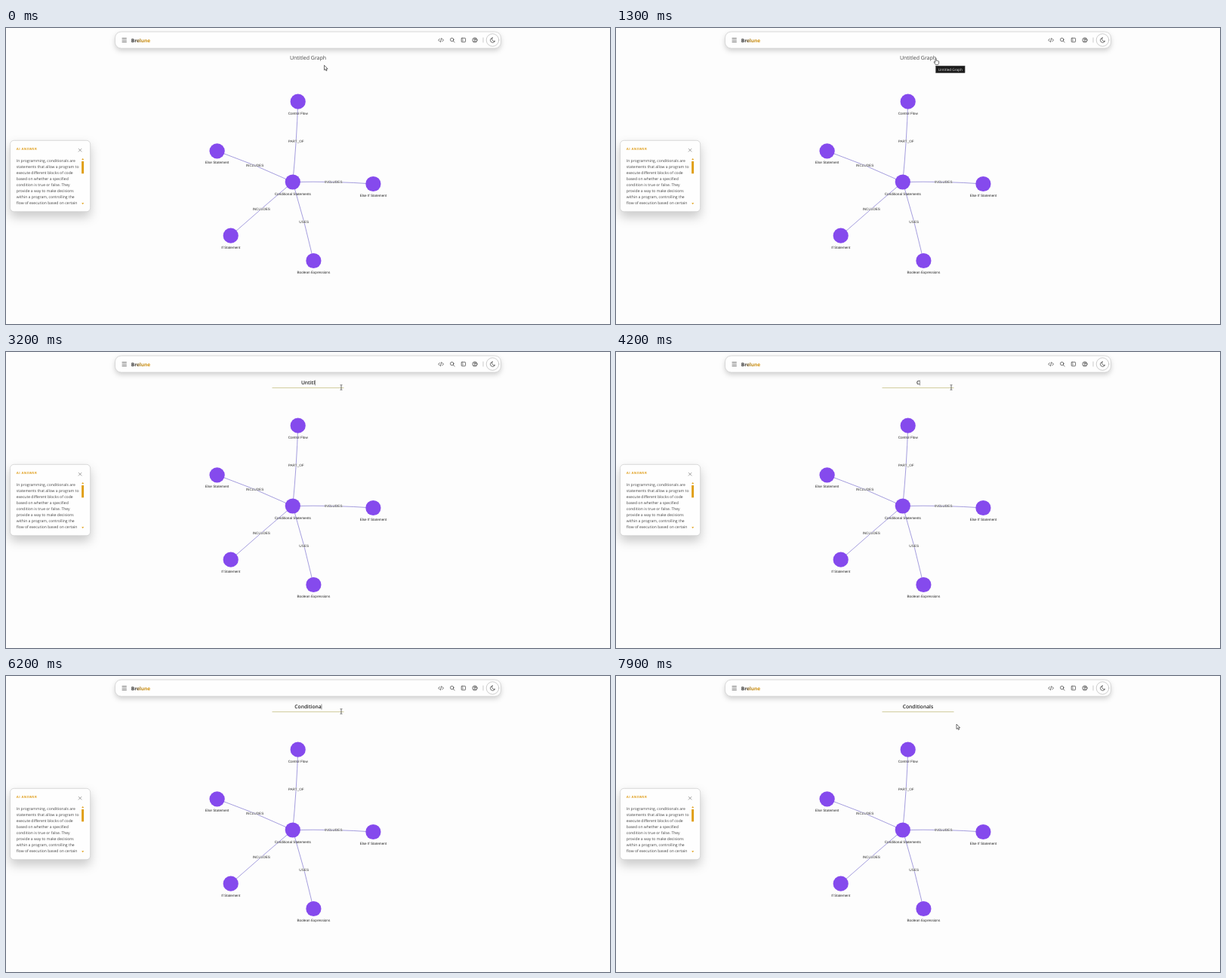
An HTML page that plays this animation: 800 by 393 pixels, repeating every 8000 ms.

```html
<!DOCTYPE html>
<html lang="en">
<head>
<meta charset="utf-8">
<title>Graph title editing</title>
<style>
  html, body { margin: 0; width: 100%; height: 100%; overflow: hidden; background: #fdfdfd; }
  svg { display: block; width: 100%; height: 100%; }
  text { font-family: "Open Sans", "Noto Sans", sans-serif; text-rendering: geometricPrecision; }
  .center { text-anchor: middle; }
  .card { fill: #fefefe; stroke: #d0d0d0; stroke-width: .8; }
  .bar { filter: drop-shadow(0 3px 3px rgba(0, 0, 0, .17)); }
  .panel { filter: drop-shadow(0 7px 7px rgba(0, 0, 0, .2)); }
  .icon { fill: none; stroke: #444; stroke-width: .75; stroke-linecap: round; stroke-linejoin: round; }
  #graph text { font: 4.67px "Liberation Sans", Arial, sans-serif; text-anchor: middle; fill: #222; }
  #graph path { fill: none; stroke: #8f86d6; stroke-width: .8; }
  #graph circle { fill: #854aed; }
  #graph .edge { fill: #333; stroke: #fdfdfd; stroke-width: .7; paint-order: stroke; }
  #body text { font-size: 5.05px; fill: #444; }
  #cursor path { fill: #fff; stroke: #222; stroke-width: .65; stroke-linejoin: round; }
</style>
</head>
<body>
<svg viewBox="0 0 800 393" preserveAspectRatio="none">
  <defs>
    <linearGradient id="brand">
      <stop offset=".2" stop-color="#303030"/>
      <stop offset=".5" stop-color="#b98312"/>
      <stop offset="1" stop-color="#d9940c"/>
    </linearGradient>
  </defs>

  <g id="graph"></g>

  <rect class="card bar" x="144.5" y="5" width="511" height="22" rx="8"/>
  <path class="icon" d="M154 13.7h5.4M154 16.1h5.4M154 18.5h5.4"/>
  <text x="165.8" y="18.5" font-size="6.5" font-weight="700" fill="url(#brand)">Brelune</text>
  <g class="icon">
    <path d="M574.4 14.3l-1.7 1.8 1.7 1.8M577.8 14.3l1.7 1.8-1.7 1.8M576.7 13.6l-1.2 5"/>
    <path d="M592.5 17.4l1.6 1.6"/><circle cx="590.7" cy="15.5" r="2.2"/>
    <rect x="603.2" y="13.4" width="5.4" height="5.2" rx=".8"/>
    <path d="M604.5 15.2l1.1 .9-1.1 .9"/>
    <circle cx="621" cy="16" r="3.1"/><circle cx="621" cy="15.1" r="1.1"/>
    <path d="M619.1 18.3q1.9-2.2 3.8 0"/>
    <path d="M632 13v6" stroke="#bbb"/>
    <circle cx="644.5" cy="16" r="8.3" stroke="#bdbdbd"/>
    <path d="M644.2 13a3.2 3.2 0 1 0 3.5 4.2a2.8 2.8 0 0 1-3.5-4.2z"/>
  </g>

  <rect class="card panel" x="5.5" y="149.3" width="106.2" height="94.5" rx="5"/>
  <text x="13.8" y="161.7" font-size="4.3" font-weight="700" letter-spacing=".4" fill="#e0a020">AI ANSWER</text>
  <path class="icon" d="M96.2 160.3l3.8 3.8M100 160.3l-3.8 3.8" stroke-width=".5" style="stroke:#888"/>
  <g id="body"></g>
  <g fill="#e09f16">
    <rect x="100.1" y="177" width="3" height="16.3"/>
    <path d="M100.2 175l1.5-1.9 1.5 1.9zM100.2 232.3l1.5 1.9 1.5-1.9z"/>
  </g>

  <path id="underline" d="M352.5 47.6h95" stroke="#cdc894" stroke-width=".9"/>
  <text id="title" class="center" x="400"></text>
  <path id="caret" stroke="#222" stroke-width=".5"/>
  <g id="tooltip">
    <rect x="423.5" y="50.3" width="38.6" height="9.3" fill="#1b1b1b" stroke="#444" stroke-width=".4"/>
    <text class="center" x="442.8" y="56.7" font-size="4.65" fill="#e4e4e4">Untitled Graph</text>
  </g>
  <g id="cursor">
    <path id="arrow" d="M0 0v6.4l1.5-1.3 1 2.3 1.1-.5-1-2.2h2z"/>
    <path id="hand" d="M-.6 .5q.7-.9 1.3 0v2.8q.8-.5 1.2 .2 .8-.4 1.1 .3 .9-.2 1.1 .6v2.1q-.2 1.3-1 2.2h-3.2q-1.3-1.6-2.4-3.6 .3-1 1.9 .4z"/>
    <path id="beam" d="M-1.4-3.3q1.2 0 1.4 .5 .2-.5 1.4-.5M0-2.8v5.6M-1.4 3.3q1.2 0 1.4-.5 .2 .5 1.4 .5" style="fill:none"/>
  </g>
</svg>

<script>
const $ = id => document.getElementById(id);

function add(parent, tag, attributes, content = '') {
  const node = document.createElementNS('http://www.w3.org/2000/svg', tag);
  for (const [name, value] of Object.entries(attributes)) node.setAttribute(name, value);
  node.textContent = content;
  parent.append(node);
  return node;
}

// Graph: each outer node with the relation to the hub and where its label sits.
const hub = { name: 'Conditional Statements', x: 379.8, y: 204.5 };
const leaves = [
  { name: 'Control Flow', x: 386.7, y: 97.7, relation: 'PART_OF', lx: 384.2, ly: 149.9 },
  { name: 'Else Statement', x: 279.6, y: 163.3, relation: 'INCLUDES', lx: 329.5, ly: 182.4 },
  { name: 'Else If Statement', x: 486.4, y: 207, relation: 'INCLUDES', lx: 433.8, ly: 204.5 },
  { name: 'If Statement', x: 297.7, y: 275.7, relation: 'INCLUDES', lx: 338.2, ly: 240.2 },
  { name: 'Boolean Expressions', x: 407.4, y: 309, relation: 'USES', lx: 394.7, ly: 257 },
];
const graph = $('graph');
for (const n of leaves) {
  const cx = 2 * n.lx - (hub.x + n.x) / 2, cy = 2 * n.ly - (hub.y + n.y) / 2;
  add(graph, 'path', { d: `M${hub.x} ${hub.y}Q${cx} ${cy} ${n.x} ${n.y}` });
}
for (const n of leaves) add(graph, 'text', { class: 'edge', x: n.lx, y: n.ly + 1.7 }, n.relation);
for (const n of [hub, ...leaves]) {
  add(graph, 'circle', { cx: n.x, cy: n.y, r: 10.1 });
  add(graph, 'text', { x: n.x, y: n.y + 17 }, n.name);
}

[
  'In programming, conditionals are',
  'statements that allow a program to',
  'execute different blocks of code',
  'based on whether a specified',
  'condition is true or false. They',
  'provide a way to make decisions',
  'within a program, controlling the',
  'flow of execution based on certain',
].forEach((line, i) => add($('body'), 'text', { x: 13.8, y: 177.8 + i * 8.07 }, line));

const LOOP = 8000, STEP = 100;
const EDIT = 1500, ERASE = 2450, TYPE = 4180, ERASE_GAP = 100, TYPE_GAP = 220, COMMIT = 7700;
const OLD_TITLE = 'Untitled Graph', NEW_TITLE = 'Conditionals';
const pointer = [
  [0, 421.5, 49.5], [100, 421.5, 49.5], [200, 422, 46], [500, 422, 46], [700, 423.5, 40],
  [EDIT, 423.5, 40], [1900, 444, 47], [7600, 444, 47], [7900, 451, 64], [LOOP, 451, 64],
];

function pointerAt(t) {
  const i = pointer.findIndex(p => p[0] > t);
  const [t0, x0, y0] = pointer[i - 1], [t1, x1, y1] = pointer[i];
  const k = (t - t0) / (t1 - t0);
  return [x0 + (x1 - x0) * k, y0 + (y1 - y0) * k];
}

const keysPressed = (t, start, gap, max) =>
  Math.max(0, Math.min(max, Math.floor((t - start) / gap) + 1));

function show(id, visible) {
  $(id).style.display = visible ? '' : 'none';
}

function render(t) {
  const editing = t >= EDIT;
  const erased = keysPressed(t, ERASE, ERASE_GAP, OLD_TITLE.length);
  const typed = keysPressed(t, TYPE, TYPE_GAP, NEW_TITLE.length);
  const value = typed ? NEW_TITLE.slice(0, typed) : OLD_TITLE.slice(0, OLD_TITLE.length - erased);

  const title = $('title');
  title.textContent = value;
  title.setAttribute('y', editing ? 43.3 : 42.1);
  title.setAttribute('font-size', editing ? 6.7 : 7);
  title.setAttribute('font-weight', editing ? 600 : 500);
  title.setAttribute('fill', editing ? '#222' : '#444');
  show('underline', editing);

  // The caret stays lit after a key press, then blinks.
  const lastKey = typed ? TYPE + (typed - 1) * TYPE_GAP
    : erased ? ERASE + (erased - 1) * ERASE_GAP : EDIT;
  show('caret', editing && t < COMMIT && (t - lastKey) % 1000 < 500);
  const end = 400 + (value ? title.getComputedTextLength() / 2 : 0) + .3;
  $('caret').setAttribute('d', `M${end} 37.4v7`);

  show('tooltip', t >= 1200 && t < EDIT);
  const shape = t < 600 || t >= 7800 ? 'arrow' : t < 1600 ? 'hand' : 'beam';
  for (const id of ['arrow', 'hand', 'beam']) show(id, id === shape);
  $('cursor').setAttribute('transform', `translate(${pointerAt(t)})`);
}

const start = performance.now();
function tick() {
  const t = (performance.now() - start) % LOOP;
  render(Math.floor(t / STEP) * STEP);
  requestAnimationFrame(tick);
}
tick();
</script>
</body>
</html>
```
